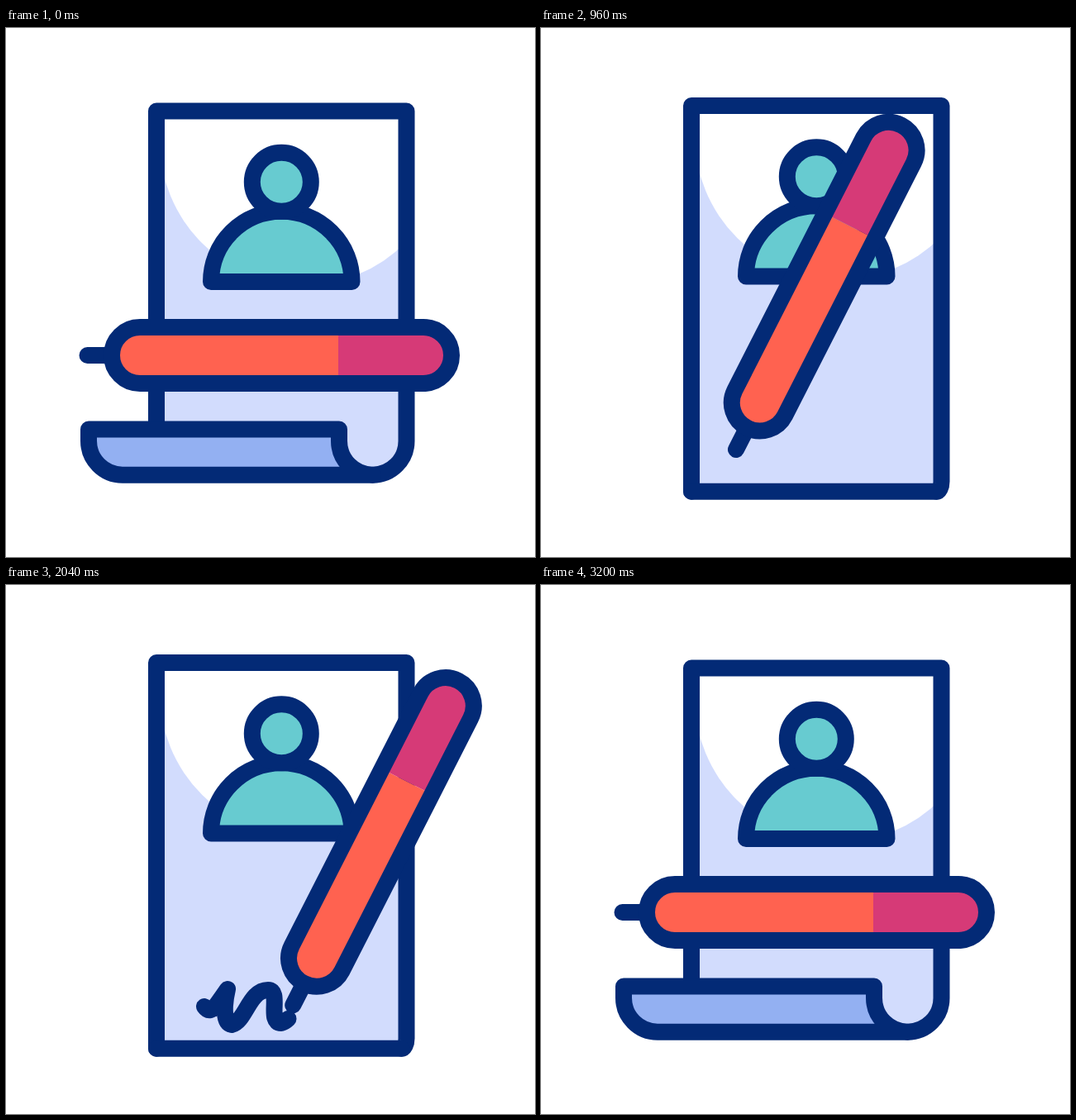
Write an HTML page that moves like this. It is 640 px wide and 640 px high and loops after 3220 ms.

```html
<!DOCTYPE html>
<html lang="en">
<head>
<meta charset="utf-8">
<title>Pen and scroll</title>
<style>
  html, body { margin: 0; width: 100%; height: 100%; overflow: hidden; background: #fff; }
  svg { display: block; width: 100%; height: 100%; }
  .line { stroke: #032a76; stroke-width: 20; stroke-linecap: round; stroke-linejoin: round; }
</style>
</head>
<body>
<svg viewBox="0 0 640 640">
  <defs>
    <clipPath id="sheetClip"><path id="sheetShape"/></clipPath>
  </defs>

  <path id="sheet" fill="#d2dcfd"/>
  <g clip-path="url(#sheetClip)"><circle id="glow" cx="360" r="174" fill="#fff"/></g>
  <path id="edge" class="line" fill="none"/>

  <g id="person" class="line" fill="#67cbd0">
    <path d="M248 206.5a85.25 85.25 0 0 1 170.5 0Z"/>
    <circle cx="333.3" cy="85.8" r="35.5"/>
  </g>

  <path id="ink" class="line" fill="none" pathLength="100"
    d="M240 510Q247 520 256 506L268 489C264 506 262 530 273 532C290 528 294 490 317 490C334 490 315 530 333 530C346 526 352 508 365 491"/>

  <path id="roll" class="line" fill="#93b0f2"/>

  <!-- pen lies along +x, with the point it turns about at the origin -->
  <g id="pen">
    <path class="line" d="M-130 0h40"/>
    <path fill="#ff6250" d="M173.5 -34v68h-240a34 34 0 0 1 0 -68Z"/>
    <path fill="#d63a77" d="M173.5 -34h103a34 34 0 0 1 0 68h-103Z"/>
    <rect class="line" fill="none" x="-100.5" y="-34" width="411" height="68" rx="34"/>
  </g>
</svg>
<script>
const LOOP = 3220, LEFT = 182, RIGHT = 484.5;
const $ = id => document.getElementById(id);
const set = (id, name, value) => $(id).setAttribute(name, value);

const mix = (a, b, k) => a + (b - a) * k;
const part = (t, from, to) => Math.min(1, Math.max(0, (t - from) / (to - from)));
const ease = (t, from, to) => {
  const u = part(t, from, to);
  return u * u * (3 - 2 * u);
};

// curl: 1 is a rolled-up foot, 0 a flat sheet
function drawPaper(top, curl) {
  const low = top + 466.7 - 26.5 * curl;
  const high = top + 466.7 - 81.7 * curl;
  const drop = high + 14 * curl;
  const rx = mix(6, 41, curl), ry = mix(12, 41, Math.min(1, curl * 4));
  const foot = RIGHT - rx;
  const inside = Math.min(foot, RIGHT - 81.5 * Math.sin(curl * Math.PI / 2));
  const left = LEFT - 82 * part(curl, .17, 1);
  const round = 41 * curl ** 1.5;

  const side = `M${LEFT} ${top}H${RIGHT}V${low - ry}A${rx} ${ry} 0 0 1 ${foot} ${low}`;
  const inner = `A${foot - inside} ${low - drop} 0 0 `;
  const sheet = `${side}${inner}1 ${inside} ${drop}V${high}H${LEFT}Z`;

  set('sheet', 'd', sheet);
  set('sheetShape', 'd', sheet);
  set('edge', 'd', `${side}M${LEFT} ${top}V${high}`);
  set('roll', 'd', `M${left} ${high}H${inside}V${drop}${inner}0 ${foot} ${low}`
    + `H${left + round}A${round} ${low - drop} 0 0 1 ${left} ${drop}Z`);
  set('glow', 'cy', top + 36.5);
  set('person', 'transform', `translate(0 ${top})`);
}

function drawInk(top, written) {
  $('ink').style.display = written > 0 ? '' : 'none';
  set('ink', 'stroke-dasharray', `${100 * written ** 1.3} 200`);
  set('ink', 'transform', `translate(0 ${top - 94})`);
}

function drawPen(t, open, written, hop) {
  const wave = 2 * Math.PI * written;
  const home = ease(t, 2220, 3200);
  const arc = 52 * Math.sin(Math.PI * part(t, 2220, 3200));

  const writeX = mix(228.5, 295, open) + 131 * written + 4 * Math.sin(wave);
  const writeY = mix(396, 394.2, open) - hop - 10 * written
    + 18 * (Math.cos(wave) - 1) + 12 * (1 - Math.cos(2 * wave));
  const x = mix(writeX, 228.5, home);
  const y = mix(writeY, 396, home) - arc;
  const turn = -63 * (open - ease(t, 2380, 3200));

  set('pen', 'transform', `translate(${x} ${y}) rotate(${turn})`);
}

function render(t) {
  const open = ease(t, 160, 453);
  const hop = 48 * (ease(t, 160, 390) - ease(t, 390, 780));
  const written = part(t, 1100, 2180);
  const curl = 1 - ease(t, 160, 470) + ease(t, 2180, 2705);
  const top = 100.5 - 6.5 * (open - ease(t, 2180, 3000)) - hop;

  drawPaper(top, curl);
  drawInk(top, t < 2900 ? written : 0);
  drawPen(t, open, written, hop);
}

const start = performance.now();
function tick() {
  render((performance.now() - start) % LOOP);
  requestAnimationFrame(tick);
}
render(0);
requestAnimationFrame(tick);
</script>
</body>
</html>
```
